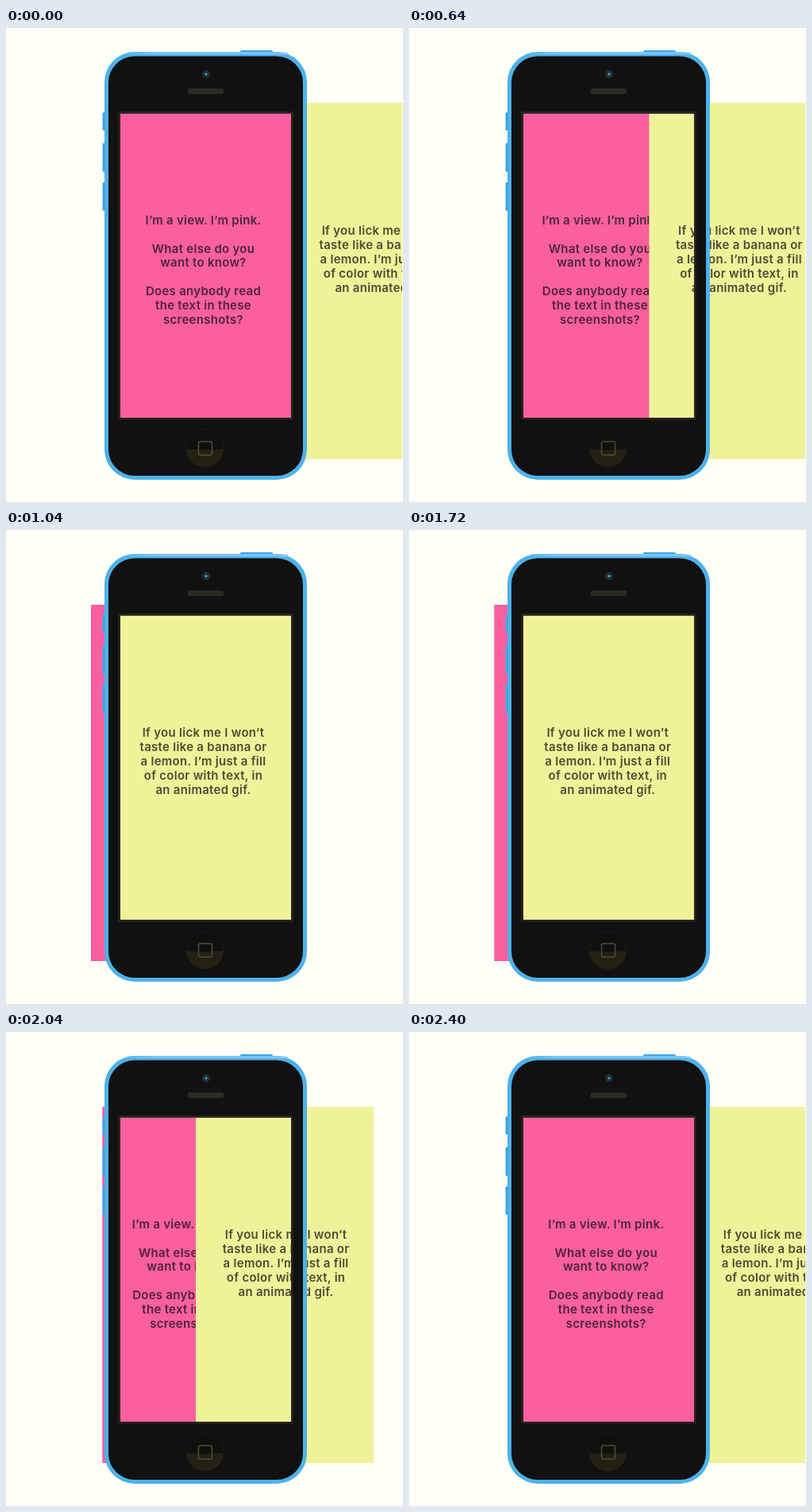
An HTML page that plays this animation: 500x596 px, repeating every 2440 ms.

```html
<!DOCTYPE html>
<html lang="en">
<head>
<meta charset="utf-8">
<title>Sliding views</title>
<style>
  html, body { margin: 0; width: 100%; height: 100%; overflow: hidden; background: #fffff7; }
  svg { display: block; width: 500px; height: 596px; }
  text {
    font: 600 15px Inter, "Open Sans", sans-serif;
    letter-spacing: .28px;
    text-anchor: middle;
    fill: #111;
    fill-opacity: .74;
  }
</style>
</head>
<body>
<svg viewBox="0 0 500 596">
  <defs>
    <clipPath id="stage"><rect width="499" height="596"/></clipPath>
    <linearGradient id="shine" x1="124" x2="379" y1="0" y2="0" gradientUnits="userSpaceOnUse">
      <stop offset=".08" stop-color="#7cc6fa" stop-opacity="0"/>
      <stop offset=".24" stop-color="#7cc6fa"/>
      <stop offset=".88" stop-color="#7cc6fa"/>
      <stop offset="1" stop-color="#7cc6fa" stop-opacity="0"/>
    </linearGradient>
    <clipPath id="homeLow"><path d="M226 529q24.500 3 49 0v26h-49z"/></clipPath>
  </defs>

  <g clip-path="url(#stage)">
    <g id="pink"><rect x="138" y="94" width="224" height="448" fill="#fb5f9f"/></g>
    <g id="yellow"><rect x="135" y="94" width="224" height="448" fill="#f0f299"/></g>
  </g>

  <g id="buttons"></g>
  <rect x="295" y="28" width="41" height="5" rx="1.500" fill="#3fa6e0"/>

  <g fill-rule="evenodd">
    <path id="shell" fill="#4db2ea"/>
    <path id="face" fill="#111"/>
  </g>
  <path d="M148 32.500Q155 31.800 163 31.800H340Q348 31.800 355 32.500" fill="none" stroke="url(#shine)" stroke-width="3"/>
  <rect x="142.500" y="106.250" width="218" height="385" fill="none" stroke="#29251c" stroke-width="2.500"/>

  <circle cx="252" cy="58" r="5" fill="#2b2c2b"/>
  <circle cx="252" cy="58" r="3" fill="#123548"/>
  <circle cx="252" cy="58" r="1.500" fill="#35b0e6"/>
  <rect x="228.500" y="76" width="46" height="7" rx="3.500" fill="#2b2a23"/>

  <circle cx="250.500" cy="528.500" r="23.500" fill="#101010" stroke="#1b1b16" stroke-width="1"/>
  <circle cx="250.500" cy="528.500" r="23.500" fill="#222114" clip-path="url(#homeLow)"/>
  <rect x="242.500" y="520" width="17" height="17" rx="2.500" fill="none" stroke="#504d2e" stroke-width="1.500"/>
</svg>

<script>
const $ = id => document.getElementById(id);
const LOOP = 2440, STEP = 40, LINE = 17.8;
const PINK_SHIFT = 31, YELLOW_SHIFT = 226;

function add(parent, tag, attrs, content = "") {
  const el = document.createElementNS("http://www.w3.org/2000/svg", tag);
  for (const key in attrs) el.setAttribute(key, attrs[key]);
  el.textContent = content;
  parent.append(el);
}

function roundRect(x, y, w, h, r) {
  const arc = (dx, dy) => `a${r} ${r} 0 0 1 ${dx} ${dy}`;
  return `M${x + r} ${y}h${w - 2 * r}${arc(r, r)}v${h - 2 * r}${arc(-r, r)}` +
    `h${2 * r - w}${arc(-r, -r)}v${2 * r - h}${arc(r, -r)}z`;
}

function addLines(panel, top, lines) {
  lines.forEach((line, i) => {
    if (line) add(panel, "text", { x: 248.5, y: top + i * LINE }, line);
  });
}

addLines($("pink"), 247, [
  "I’m a view. I’m pink.", "", "What else do you", "want to know?", "",
  "Does anybody read", "the text in these", "screenshots?"
]);
addLines($("yellow"), 260.4, [
  "If you lick me I won’t", "taste like a banana or", "a lemon. I’m just a fill",
  "of color with text, in", "an animated gif."
]);

for (const [y, h] of [[106, 23], [144.5, 36.5], [194, 36]]) {
  add($("buttons"), "rect", { x: 121.5, y, width: 5, height: h, rx: 1.5, fill: "#55b6ec" });
  add($("buttons"), "rect", { x: 122.7, y: y + 1, width: 1.2, height: h - 2, fill: "#2f93cc" });
}

// The screen is a hole in the phone, so the views slide behind it.
const screenHole = "M144 107.5H359V490H144z";
$("shell").setAttribute("d", roundRect(124, 30, 255, 538, 38) + screenHole);
$("face").setAttribute("d", roundRect(129, 35.5, 245, 527.5, 33) + screenHole);

function ease(u) {
  u = Math.min(1, Math.max(0, u));
  return u * u * (3 - 2 * u);
}

function draw(time) {
  const t = Math.floor((time % LOOP) / STEP) * STEP;
  const p = ease((t - 440) / 600) - ease((t - 1680) / 760);
  $("pink").setAttribute("transform", `translate(${-PINK_SHIFT * p} 0)`);
  $("yellow").setAttribute("transform", `translate(${YELLOW_SHIFT * (1 - p)} 0)`);
}

const start = performance.now();
function tick() {
  draw(performance.now() - start);
  requestAnimationFrame(tick);
}
tick();
</script>
</body>
</html>
```
